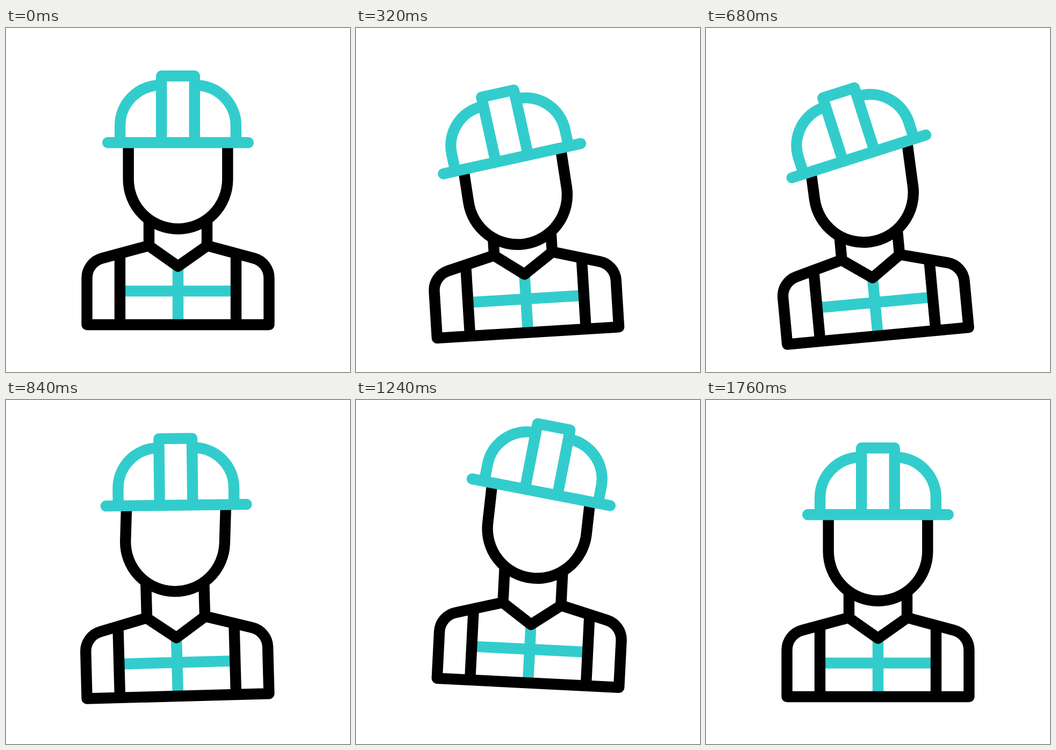
An HTML page that plays this animation: 640 px wide and 640 px high, repeating every 1.8 s.

```html
<!DOCTYPE html>
<html lang="en">
<head>
<meta charset="utf-8">
<title>Worker in a hard hat</title>
<style>
  html, body { margin: 0; width: 100%; height: 100%; overflow: hidden; background: #fff; }
  svg { display: block; width: 100%; height: 100%; }
  path { fill: none; stroke: #000; stroke-width: 20.4; stroke-linejoin: round; }
  .teal { stroke: #3cc; }
  .solid { fill: #fff; }
</style>
</head>
<body>
<svg viewBox="-320 0 640 640">
  <g id="body">
    <path class="teal" d="M0 443V552M-108 489.4H108"/>
    <path d="M-54 330V405M54 330V405M-108 420V552M108 420V552"/>
    <path d="M0 443.4L54.5 405L141.2 428.3A38 38 0 0 1 169.4 465V552H-169.4V465A38 38 0 0 1 -141.2 428.3L-54.5 405Z"/>
    <g id="head">
      <path class="solid" d="M-92.3 190V281.5A92.3 92.3 0 0 0 92.3 281.5V190"/>
      <g id="helmet">
        <path class="teal solid" d="M-107.8 213V181A75 75 0 0 1 -33 106.5H33A75 75 0 0 1 107.8 181V213"/>
        <path class="teal solid" d="M-30.8 213V89.3H30.8V213"/>
        <path class="teal" stroke-linecap="round" d="M-130.8 213.3H130.8"/>
      </g>
    </g>
  </g>
</svg>
<script>
  const LOOP = 1800, STEP = 40;
  const RISE = 1.15; // height of the upswing relative to the dip

  function ease(x) {
    const u = Math.min(1, Math.max(0, x));
    return u * u * (3 - 2 * u);
  }

  // Dips while leaning left, rises while leaning right, then returns to rest.
  function swing(id, { pivot, dip, left, right, starts, span }) {
    const node = document.getElementById(id);
    return time => {
      const [lean, cross, settle] = starts.map(start => ease((time - start) / span));
      const toLeft = lean - cross, toRight = cross - settle;
      const shift = dip * (toLeft - RISE * toRight);
      const angle = right * toRight - left * toLeft;
      node.setAttribute("transform", `translate(0 ${shift}) rotate(${angle} 0 ${pivot})`);
    };
  }

  const parts = [
    swing("body", { pivot: 552, dip: 25.4, left: 6.1, right: 3.27, starts: [40, 590, 1130], span: 510 }),
    swing("head", { pivot: 322, dip: 16, left: 6.2, right: 3.8, starts: [45, 525, 1175], span: 365 }),
    swing("helmet", { pivot: 213.3, dip: 0, left: 11.2, right: 4.7, starts: [155, 610, 1205], span: 430 })
  ];

  const begin = performance.now();
  function tick() {
    const elapsed = (performance.now() - begin) % LOOP;
    const time = Math.floor(elapsed / STEP) * STEP;
    for (const pose of parts) pose(time);
    requestAnimationFrame(tick);
  }
  tick();
</script>
</body>
</html>
```
